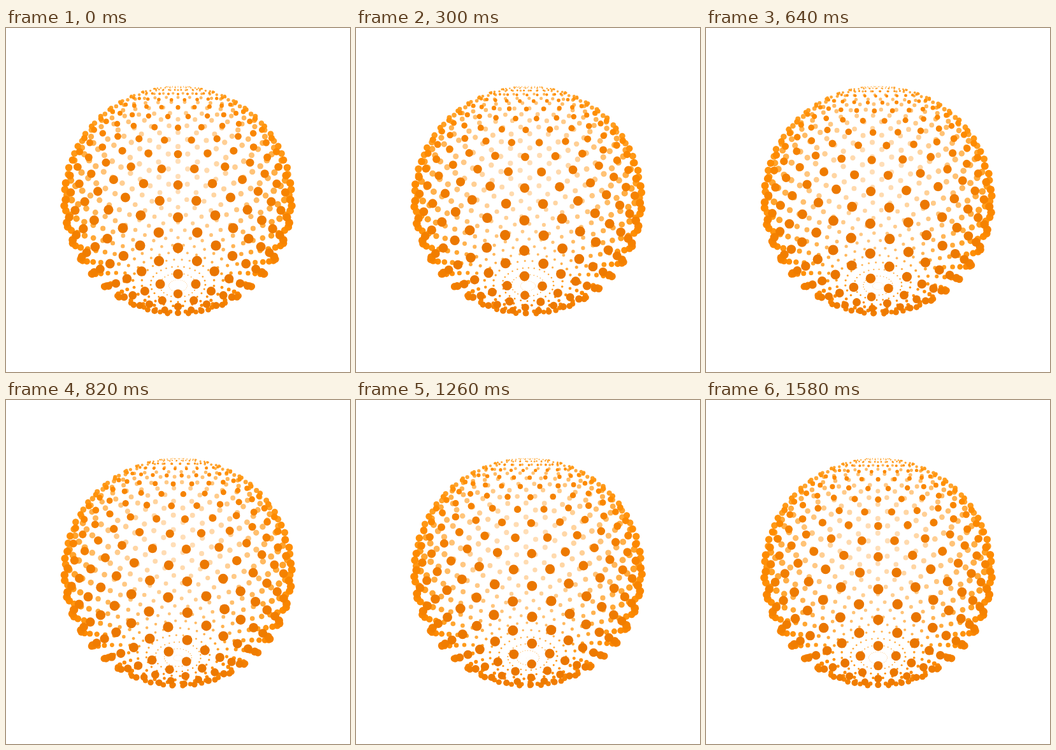
An HTML page with a canvas for the animation above (1.6 s loop, 540 by 540 pixels).

```html
<!DOCTYPE html>
<html lang="en">
<head>
<meta charset="utf-8">
<title>Dotted sphere</title>
<style>
  html, body { margin: 0; width: 100%; height: 100%; overflow: hidden; background: #fff; }
  canvas { display: block; width: 540px; height: 540px; }
</style>
</head>
<body>
<canvas id="stage" width="540" height="540"></canvas>
<script>
const ctx = document.getElementById('stage').getContext('2d');
const SIZE = 540, CENTER = SIZE / 2;
const LOOP = 1600;
const ROWS = 32, PER_ROW = 26;
const RADIUS = 167, DOT = 5.4;
const CAMERA = CENTER / Math.tan(Math.PI / 6);
const SIN_TILT = Math.sin(0.4), COS_TILT = Math.cos(0.4);
const STEP = 2 * Math.PI / PER_ROW;

// Colour stops from the far side to the near side: [depth, r, g, b]
const SHADES = [
  [-1, 255, 222, 184],
  [0, 255, 160, 36],
  [0.3, 255, 140, 0],
  [1, 232, 116, 0]
];

function shade(depth) {
  let k = 1;
  while (k < SHADES.length - 1 && depth > SHADES[k][0]) k++;
  const a = SHADES[k - 1], b = SHADES[k];
  const mix = (depth - a[0]) / (b[0] - a[0]);
  const channel = n => Math.round(a[n] + (b[n] - a[n]) * mix);
  return `rgb(${channel(1)},${channel(2)},${channel(3)})`;
}

function makeDot(row, column) {
  const polar = Math.PI * row / ROWS;
  const turn = column * STEP - (row - 1) * STEP / 2;
  const ring = Math.sin(polar);
  const up = Math.cos(polar);
  const depth = ring * Math.cos(turn);

  // Tip the north pole towards the viewer, then project.
  const y = depth * SIN_TILT - up * COS_TILT;
  const z = depth * COS_TILT + up * SIN_TILT;
  const scale = CAMERA / (CAMERA - z * RADIUS);
  return {
    x: CENTER + ring * Math.sin(turn) * RADIUS * scale,
    y: CENTER + y * RADIUS * scale,
    z,
    r: DOT * ring * scale,
    color: shade(depth)
  };
}

function draw(phase) {
  const dots = [];
  for (let i = 0; i < ROWS; i++) {
    for (let j = 0; j < PER_ROW; j++) dots.push(makeDot(i + phase, j));
  }
  dots.sort((a, b) => a.z - b.z);

  ctx.fillStyle = '#fff';
  ctx.fillRect(0, 0, SIZE, SIZE);
  for (const dot of dots) {
    ctx.fillStyle = dot.color;
    ctx.beginPath();
    ctx.arc(dot.x, dot.y, dot.r, 0, 2 * Math.PI);
    ctx.fill();
  }
}

function tick() {
  draw(performance.now() % LOOP / LOOP);
  requestAnimationFrame(tick);
}
tick();
</script>
</body>
</html>
```
